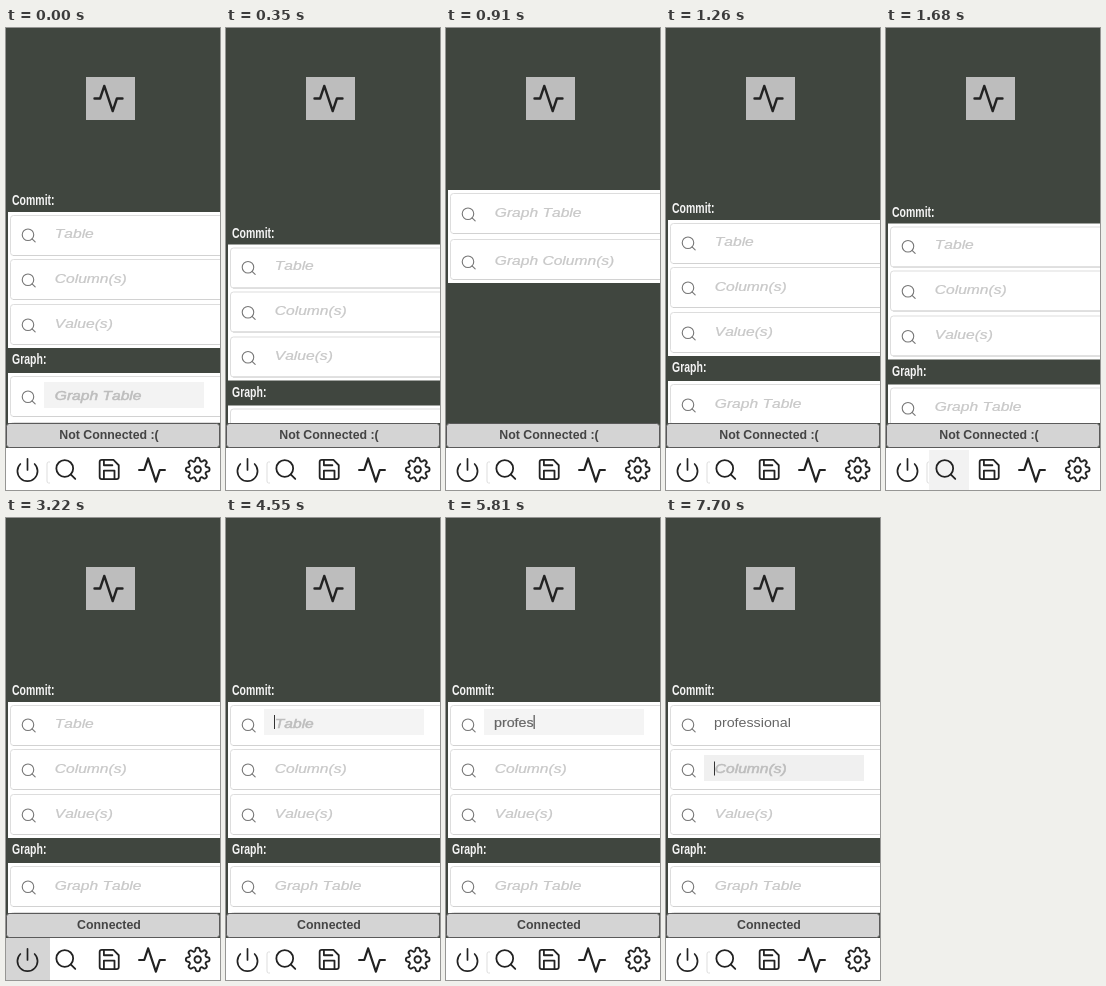
These frames come from a looping animation (214x462 px, 8000 ms). An HTML page:

```html
<!DOCTYPE html>
<html lang="en">
<head>
<meta charset="utf-8">
<title>Commit and graph form</title>
<style>
  html, body { margin: 0; width: 100%; height: 100%; overflow: hidden; background: #40463f; }
  svg { display: block; width: 100%; height: 100%; }
  text { font-family: "Liberation Sans", Arial, sans-serif; font-kerning: none; }
  .icon { fill: none; stroke: #222; stroke-linecap: round; stroke-linejoin: round; }
  .label { font-size: 14px; font-weight: bold; fill: #f4f4f4; }
  .hint { font-size: 13px; font-style: italic; fill: #c8c8c8; stroke: #c8c8c8; stroke-width: .25px; }
  .hint.active { fill: #bdbdbd; stroke: #bdbdbd; stroke-width: .5px; }
  .typed { font-size: 12.4px; fill: #666; }
  .typed.active { stroke: #666; stroke-width: .2px; }
  .status { font-size: 12.35px; font-weight: bold; fill: #444; text-anchor: middle; }
  .box { fill: #fff; stroke: #ddd; }
  .caret { fill: #333; }
</style>
</head>
<body>
<svg viewBox="0 0 214 462" preserveAspectRatio="none">
  <defs>
    <clipPath id="view"><rect y="159" width="214" height="237"/></clipPath>
    <g id="search"><circle cx="11" cy="11" r="8"/><path d="M21 21l-4.35-4.35"/></g>
    <path id="pulse" d="M22 12h-4l-3 9L9 3l-3 9H2"/>
    <path id="power" d="M18.36 6.64a9 9 0 1 1-12.73 0M12 2v10"/>
    <path id="save" d="M19 21H5a2 2 0 0 1-2-2V5a2 2 0 0 1 2-2h11l5 5v11a2 2 0 0 1-2 2zM17 21v-8H7v8M7 3v5h8"/>
    <path id="tooth" d="M19.4 15a1.65 1.65 0 0 0 .33 1.82l.06.06a2 2 0 0 1-2.83 2.83l-.06-.06a1.65 1.65 0 0 0-1.82-.33 1.65 1.65 0 0 0-1 1.51V21a2 2 0 0 1-4 0v-.09A1.65 1.65 0 0 0 9 19.4"/>
    <g id="gear">
      <circle cx="12" cy="12" r="3"/>
      <use href="#tooth"/>
      <use href="#tooth" transform="rotate(90 12 12)"/>
      <use href="#tooth" transform="rotate(180 12 12)"/>
      <use href="#tooth" transform="rotate(270 12 12)"/>
    </g>
  </defs>

  <rect width="214" height="462" fill="#40463f"/>
  <rect x="80" y="49" width="49" height="43" fill="#bdbdbd"/>
  <g id="badge"></g>

  <g clip-path="url(#view)">
    <g id="content">
      <text class="label" transform="translate(6 177) scale(.75 1)">Commit:</text>
      <rect x="2" y="184" width="212" height="136" fill="#fff"/>
      <text class="label" transform="translate(6 336) scale(.75 1)">Graph:</text>
      <rect x="2" y="345" width="212" height="93" fill="#fff"/>
      <g id="fields"></g>
      <text id="typed" class="typed" transform="translate(48 208.5) scale(1.15 1)"></text>
      <rect id="caret" class="caret" width="1" height="14"/>
    </g>
  </g>

  <rect y="395" width="214" height="67" fill="#40463f"/>
  <rect y="420" width="214" height="42" fill="#fff"/>
  <rect x=".5" y="395.5" width="213" height="24" rx="3" fill="#d4d4d4" stroke="#5a5a5a"/>
  <text id="status" class="status" x="103" y="410.5"></text>
  <path d="M44 434h-1.500q-1.500 0-1.500 2v17q0 2 1.500 2h1.500" fill="none" stroke="#ddd"/>
  <rect id="powerGlow" y="420" width="44" height="42"/>
  <rect id="searchGlow" x="43" y="422" width="40" height="40" fill="#f2f2f2"/>
  <g id="nav"></g>
</svg>
<script>
const LOOP = 8000, TICK = 70, TYPED_SCALE = 1.15;
const $ = id => document.getElementById(id);
const show = (el, on) => el.setAttribute('visibility', on ? 'inherit' : 'hidden');

// Icons use a 24-unit grid centred on (x, y).
const icon = (name, x, y, scale, width, color = '#222') =>
  `<use href="#${name}" class="icon" transform="translate(${x} ${y}) scale(${scale}) translate(-12 -12)"
    style="stroke:${color};stroke-width:${width / scale}"/>`;

$('badge').innerHTML = icon('pulse', 102.5, 70.5, 1.4, 2.4);
$('nav').innerHTML =
  icon('power', 21.5, 442, 1.12, 1.7) +
  icon('search', 59.8, 441.5, 1.05, 1.8) +
  icon('save', 103.2, 441.5, 1.06, 1.8) +
  icon('pulse', 146, 442, 1.29, 2.2) +
  icon('gear', 191.7, 441.5, 1.08, 1.8);

// Hint, box top, box height, text baseline, highlight top
const fields = [
  ['Table', 187.5, 40, 209.5, 191],
  ['Column(s)', 231.5, 40, 254.5, 237],
  ['Value(s)', 276.5, 40, 299.5, 282],
  ['Graph Table', 348.5, 40, 371.5, 354],
  ['Graph Column(s)', 394.5, 40, 419.5, 400],
];
$('fields').innerHTML = fields.map(([hint, top, height, base, glow]) => `<g>
  <rect class="box" x="4.5" y="${top}" width="220" height="${height}" rx="3"/>
  <path d="M7 ${top + height}H214" stroke="#d2d2d2"/>
  <rect class="glow" x="38" y="${glow}" width="160" height="26" visibility="hidden"/>
  ${icon('search', 22.7, base - 2, .72, 1.1, '#777')}
  <text class="hint" transform="translate(48.8 ${base}) scale(1.2 1)">${hint}</text></g>`).join('');
const rows = [...$('fields').children].map(g => ({
  glow: g.querySelector('.glow'), hint: g.querySelector('.hint')
}));

// Scroll offset for each tick: pull down, fling up, spring back
const scroll = [0, 4, 11, 19, 27, 32.5, 32.5, 24, 2, -40, -95, -150, -150,
  -183, -188, -160, -105, -45, 8, 8, 30, 36, 28, 18, 11.5, 8, 6, 4, 3, 3, 2, 1, 1, 0];

const word = 'professional';
const keyTimes = [4970, 5110, 5250, 5250, 5530, 5810, 5880, 6020, 6160, 6230, 6440, 6650];

function highlight(row, color) {
  show(row.glow, color);
  if (color) row.glow.setAttribute('fill', color);
  row.hint.classList.toggle('active', !!color);
}

function render(t) {
  const within = (from, to) => t >= from && t < to;
  const offset = scroll[Math.floor(t / TICK)] ?? 0;
  $('content').setAttribute('transform', `translate(0 ${offset})`);

  $('status').textContent = t < 3220 ? 'Not Connected :(' : 'Connected';
  show($('searchGlow'), within(1540, 2100));
  show($('powerGlow'), within(2100, 3360));
  $('powerGlow').setAttribute('fill', t < 3220 ? '#f0f0f0' : '#d5d5d5');

  const [table, column, , graph] = rows;
  highlight(graph, t < 70 && '#f3f3f3');
  highlight(table, within(3990, 7350) && (t < 4130 ? '#efefef' : '#f4f4f4'));
  highlight(column, t >= 7560 && '#f0f0f0');

  const typed = $('typed'), caret = $('caret');
  const text = word.slice(0, keyTimes.filter(k => k <= t).length);
  typed.textContent = text;
  typed.classList.toggle('active', t < 7280);
  show(table.hint, !text);

  const inColumn = t >= 7700;
  const textWidth = inColumn || !text ? 0 : typed.getComputedTextLength() * TYPED_SCALE;
  show(caret, within(4550, 7280) || inColumn);
  caret.setAttribute('x', 48 + textWidth);
  caret.setAttribute('y', inColumn ? 243.5 : 197);
}

const start = performance.now();
function frame() {
  render((performance.now() - start) % LOOP);
  requestAnimationFrame(frame);
}
frame();
</script>
</body>
</html>
```
